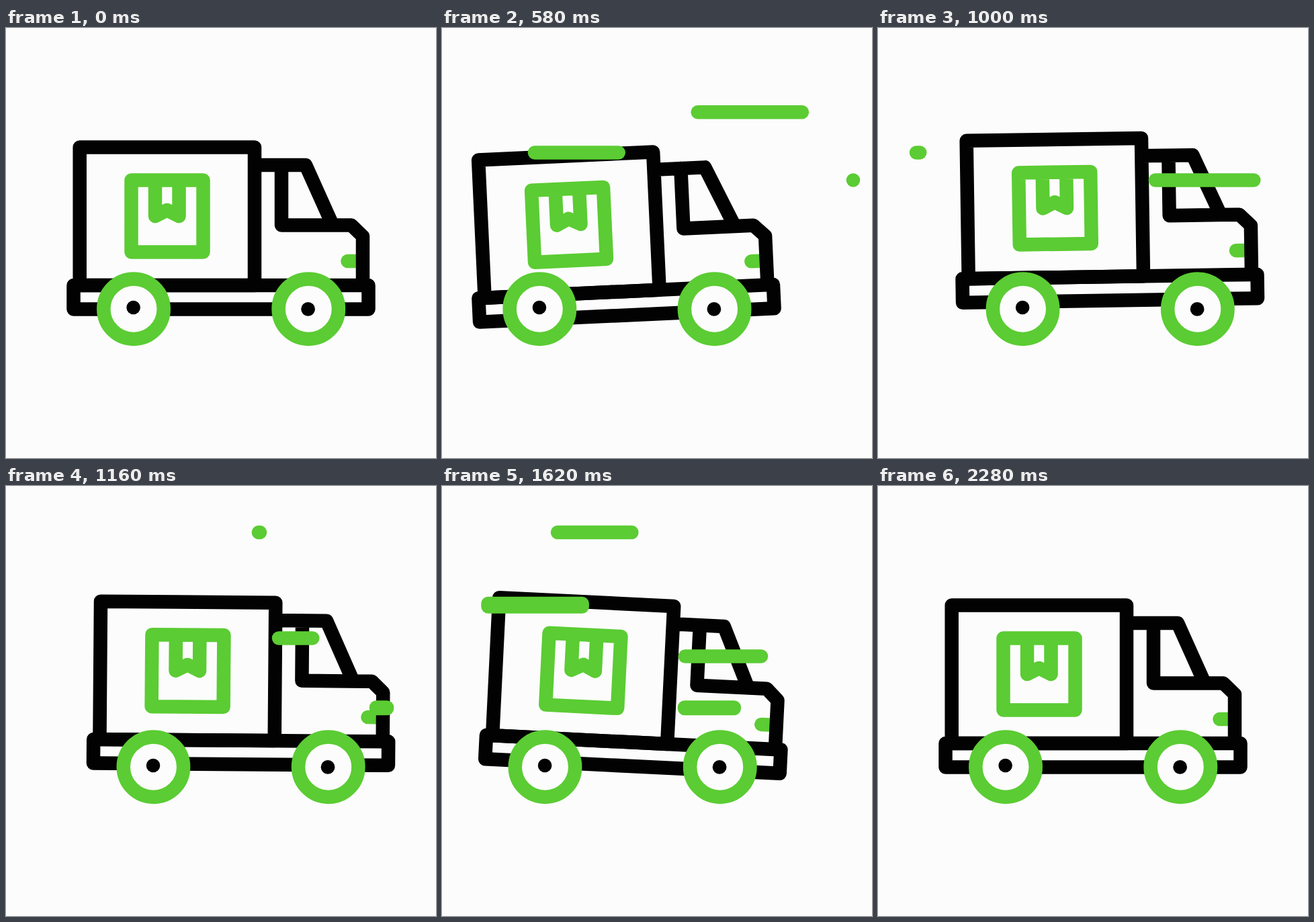
Write an HTML page that moves like this. It is 640x640 px and loops after 2.4 s.

```html
<!DOCTYPE html>
<html lang="en">
<head>
<meta charset="utf-8">
<title>Delivery truck</title>
<style>
  html, body { margin: 0; width: 100%; height: 100%; overflow: hidden; background: #fcfcfc; }
  svg { display: block; width: 100vw; height: 100vh; }
  .line { fill: none; stroke: #020202; stroke-width: 20.5; stroke-linecap: round; stroke-linejoin: round; }
  .green { stroke: #5bcc33; }
  .wheel { fill: #fcfcfc; stroke: #5bcc33; stroke-width: 20.5; }
  .hub { fill: #020202; }
  #streaks { fill: #5bcc33; }
</style>
</head>
<body>
<svg viewBox="0 0 640 640">
  <g id="truck">
    <g id="body">
      <path class="line green" d="M508.5 347H522"/>
      <path class="line" d="M109.7 177.6H370V383H109.7ZM370 204H446L486 293M410 204V293.5H514L531 310V383"/>
      <path class="line" d="M100.5 383H539.5V418.5H100.5Z"/>
      <path class="line green" d="M186.5 226.5H293.5V333.5H186.5ZM222 227V280L239.7 271L257.5 280V227"/>
    </g>
    <circle class="wheel" cx="190" cy="418.2" r="44.7"/>
    <circle class="wheel" cx="450.3" cy="418.2" r="44.7"/>
    <circle class="hub" cx="189.6" cy="416" r="10.3"/>
    <circle class="hub" cx="449.6" cy="418.4" r="10.4"/>
  </g>
  <g id="streaks"></g>
</svg>
<script>
  const LOOP = 2400, SWING = 550;
  // Every streak runs LENGTH to the left; its tail repeats the head's move after DELAY
  const LENGTH = 206, SPAN = 480, DELAY = 262, CAP = 10.25;

  const truck = document.getElementById('truck');
  const body = document.getElementById('body');
  const layer = document.getElementById('streaks');

  const clamp = v => Math.min(1, Math.max(0, v));
  const ease = f => (1 - Math.cos(Math.PI * clamp(f))) / 2;

  // Eases through [time, value] poses; the last move settles a little sooner
  function pose(keys, t) {
    const last = keys.length - 1;
    let i = 1;
    while (i < last && t >= keys[i][0]) i++;
    const [t0, a] = keys[i - 1], [t1, b] = keys[i];
    let f = clamp((t - t0) / (t1 - t0));
    if (i === last) f = 1 - (1 - f) ** 1.15;
    return a + (b - a) * ease(f);
  }

  const shift = [0, -45.3, 31.5, -37, 0].map((x, i) => [i * SWING, x]);
  const tilt = [[0, 0], [595, -2.65], [1640, 2.82], [4 * SWING, 0]];
  const bounce = [[0, 0], [570, 9], [1010, -13], [1330, 6], [1890, -8], [4 * SWING, 0]];

  function streak(birth, x, y, weight = 20.5) {
    const el = document.createElementNS('http://www.w3.org/2000/svg', 'rect');
    el.setAttribute('y', y - weight / 2);
    el.setAttribute('height', weight);
    el.setAttribute('rx', CAP);
    layer.appendChild(el);
    return t => {
      const age = t - birth;
      const head = x - LENGTH * ease(age / SPAN);
      const tail = x - LENGTH * ease((age - DELAY) / SPAN);
      const on = age >= 0 && age < DELAY + SPAN;
      el.setAttribute('visibility', on ? 'visible' : 'hidden');
      el.setAttribute('x', head - CAP);
      el.setAttribute('width', tail - head + 2 * CAP);
    };
  }

  const streaks = [
    streak(222, 556, 125.3),
    streak(308, 263, 185.5),
    streak(577, 612, 226.4),
    streak(1075, 567, 330.3, 22),
    streak(1130, 378, 69),
    streak(1181, 271, 177.3, 25),
    streak(1366, 475, 253.4)
  ];

  function draw(t) {
    truck.setAttribute('transform', `translate(${pose(shift, t)} 0)`);
    body.setAttribute('transform',
      `translate(0 ${pose(bounce, t)}) rotate(${pose(tilt, t)} 320 418)`);
    streaks.forEach(move => move(t));
  }

  const start = performance.now();
  function tick() {
    draw((performance.now() - start) % LOOP);
    requestAnimationFrame(tick);
  }
  tick();
</script>
</body>
</html>
```
